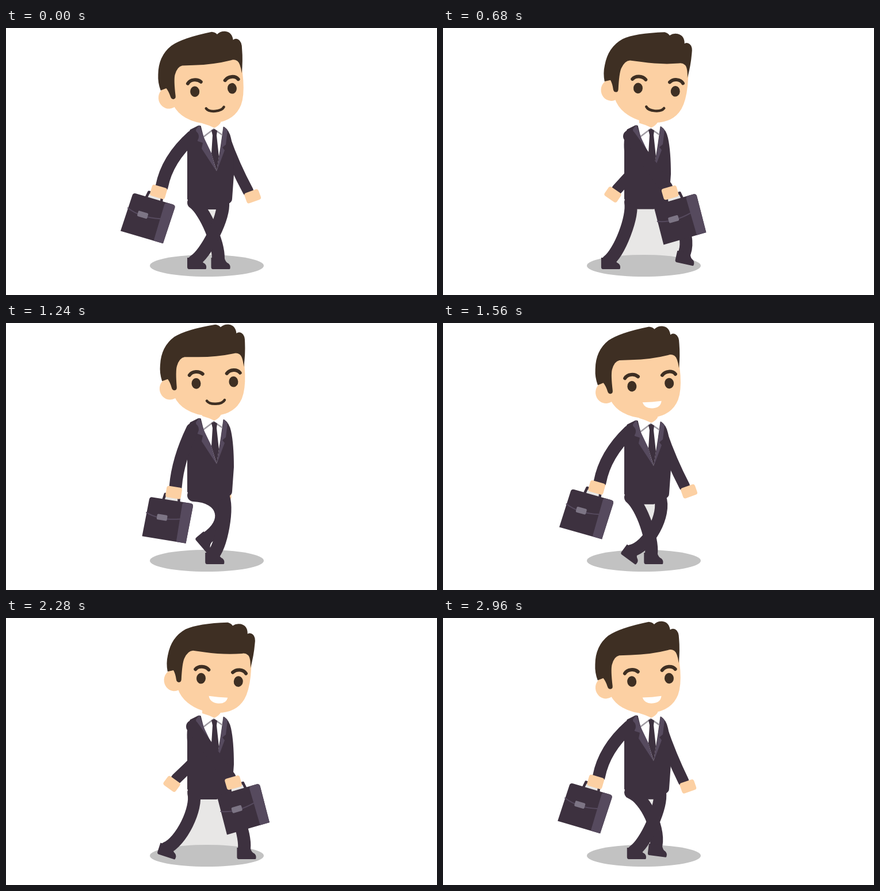
An HTML page with a canvas that plays this animation: 749 by 465 pixels, repeating every 3000 ms.

```html
<!DOCTYPE html>
<html lang="en">
<head>
<meta charset="utf-8">
<title>Walking businessman</title>
<style>
  html, body { margin: 0; width: 100%; height: 100%; overflow: hidden; background: #fff; }
  canvas { display: block; }
</style>
</head>
<body>
<canvas id="stage" width="749" height="465"></canvas>
<script>
const ctx = document.getElementById('stage').getContext('2d');
const SUIT = '#3d313f', LAPEL = '#564a5e', SKIN = '#fcd0a3', HAIR = '#3e2f23';
const GAP = '#e8e7e6', SHADOW = '#c2c2c2', CLASP = '#7d7585';
const LOOP = 3000, CYCLE = 1500, STEP = 750, TICK = 40;
const STRIDE = 90, GROUND = 420;

// Foot in the air: progress, x, lift, toe-down angle
const SWING = [
  [0, 0, 0, 0], [.08, -10, 9, 36], [.3, 12, 34, 62],
  [.63, 53, 34, 53], [.91, 88, 9, 12], [1, STRIDE, 0, 0]
];

const shape = {
  foot: 'M-16-20H7Q9-12 14-10Q18-7 17-1L16 0H-13Q-16 0-16-4Z',
  torso: 'M334 170L320 177Q313 190 315 215V298Q318 304 327 307L338 316H366L387 306Q393 303 393 297L396 255Q396 215 391 192Q388 178 379 172Z',
  shirt: 'M338 168L344 192L366 249L373 205L378 169Z',
  neck: 'M341 150H373V165Q369 171 362 174Q352 169 341 166Z',
  lapelL: 'M336 169L330 177L333 197L342 200L340 210L366 250L357 218L345 193Z',
  lapelR: 'M378 172L385 178L382 203L376 208L380 213L366 250L373 210Z',
  tie: 'M357 178L362 176L367 179L366 187L370 224L366 249L357 219L359 187Z',
  collar: 'M344 189L361 176L377 187',
  face: 'M284 50H418L418.5 95Q418 122 411 137Q398 163 364 164.500Q335 166 313 151Q300 142 294 128Z',
  hair: 'M274 100Q270 86 272 72Q275 40 299 24Q320 12 371 6Q377 7 380 11Q386 6 394 7Q406 9 407 23Q411 20 416 23Q422 27 421 40Q421 60 417 82Q416 64 411 60Q406 56 400 58Q370 63 335 61L315 60Q306 61 301 75Q298 84 299 112Q299 117 295 117Q291 117 290 112Q288 103 284 97Z',
  brows: 'M322 92C327 85 339 85 345 91M387 92C393 85 405 85 410 92',
  smile: 'M350 138C355 146 376 146 381 138',
  grin: 'M349 136.500Q366 137.500 382 136.500Q380 148 366 148Q352 148 349 136.500Z',
  handle: 'M-14 17L-12 5H12L14 17',
  caseBody: 'M-33 14H34Q39 14 39 19L37 84H-40L-38 19Q-38 14-33 14Z',
  caseSide: 'M20 19Q20 14 25 14H34Q39 14 39 19L37 84H20Z',
  flap: 'M-39 42Q-14 52 20 44'
};
for (const key in shape) shape[key] = new Path2D(shape[key]);

function fill(path, color) {
  ctx.fillStyle = color;
  ctx.fill(path);
}

function stroke(path, color, width) {
  ctx.strokeStyle = color;
  ctx.lineWidth = width;
  ctx.lineCap = ctx.lineJoin = 'round';
  ctx.stroke(path);
}

function oval(x, y, rx, ry, color) {
  const path = new Path2D();
  path.ellipse(x, y, rx, ry, 0, 0, Math.PI * 2);
  fill(path, color);
}

function block(x, y, w, h, r, color) {
  const path = new Path2D();
  path.roundRect(x - w / 2, y - h / 2, w, h, r);
  fill(path, color);
}

function at(x, y, degrees, draw) {
  ctx.save();
  ctx.translate(x, y);
  ctx.rotate(degrees * Math.PI / 180);
  draw();
  ctx.restore();
}

// Eased pendulum from -1 to 1 and back
function pendulum(t) {
  const s = -Math.cos(t / STEP * Math.PI);
  return 1.1 * s - .1 * s ** 3;
}

function footPose(t, baseX) {
  const p = (t % CYCLE) / STEP;
  if (p >= 1) return { x: baseX + STRIDE * (2 - p), y: GROUND, turn: 0, lift: 0, bend: 10 };
  const i = SWING.findIndex(row => row[0] > p);
  const a = SWING[i - 1], b = SWING[i];
  const f = (p - a[0]) / (b[0] - a[0]);
  const [, dx, lift, turn] = a.map((v, n) => v + (b[n] - v) * f);
  return { x: baseX + dx, y: GROUND - lift, turn, lift, bend: 10 + 32 * Math.sin(p * Math.PI) };
}

// Curve from hip to ankle, bent forward
function legCurve(hx, hy, foot) {
  const r = foot.turn * Math.PI / 180, c = Math.cos(r), s = Math.sin(r);
  const ax = foot.x - 4 * c + 14 * s, ay = foot.y - 4 * s - 14 * c;
  const dx = ax - hx, dy = ay - hy, d = Math.hypot(dx, dy);
  const nx = dy / d * foot.bend * 4 / 3, ny = -dx / d * foot.bend * 4 / 3;
  return [hx, hy, hx + nx + dx * .2, hy + ny + dy * .2, ax + nx - dx * .2, ay + ny - dy * .2, ax, ay];
}

function drawLeg(curve, foot) {
  const path = new Path2D();
  path.moveTo(curve[0], curve[1]);
  path.bezierCurveTo(...curve.slice(2));
  stroke(path, SUIT, 22);
  at(foot.x, foot.y, foot.turn, () => fill(shape.foot, SUIT));
}

function drawGap(a, b) {
  const path = new Path2D();
  path.moveTo(b[0], b[1]);
  path.bezierCurveTo(...b.slice(2));
  path.lineTo(a[6], a[7]);
  path.bezierCurveTo(a[4], a[5], a[2], a[3], a[0], a[1]);
  fill(path, GAP);
}

function drawFarArm(t, bob) {
  const m = -pendulum(t - 20);
  const x = 358.5 + 70.5 * m * (.6 + .4 * m * m);
  const y = 291 + 2 * m + 8 * (1 - m * m);
  const path = new Path2D();
  path.moveTo(380, 192 + bob);
  path.quadraticCurveTo(368 + 29 * m, 240, x - 8 * m, y - 9);
  stroke(path, SUIT, 19);
  at(x, y, 8 - 28 * m, () => block(0, 0, 26, 19, 4, SKIN));
}

function drawTorso() {
  fill(shape.torso, SUIT);
  fill(shape.shirt, '#fff');
  fill(shape.neck, SKIN);
  stroke(shape.collar, '#a09ca3', 2.5);
  fill(shape.tie, SUIT);
  fill(shape.lapelL, LAPEL);
  fill(shape.lapelR, LAPEL);
}

function drawHead(grin) {
  oval(287, 114, 18, 19, SKIN);
  fill(shape.face, SKIN);
  fill(shape.hair, HAIR);
  oval(333, 107, 8, 9.3, HAIR);
  oval(398, 107, 8, 9.3, HAIR);
  stroke(shape.brows, HAIR, 6);
  if (grin) fill(shape.grin, '#fff');
  else stroke(shape.smile, HAIR, 4.5);
}

function drawNearArm(k, bob) {
  const angle = 2.5 + 34 * k, length = 117 + 4 * k, r = angle * Math.PI / 180;
  const sx = 324, sy = 189 + bob;
  const handX = sx + length * Math.sin(r), handY = sy + length * Math.cos(r);
  at(sx, sy, -angle, () => {
    const path = new Path2D();
    path.moveTo(0, 0);
    path.quadraticCurveTo(Math.min(0, k) * 17, length / 2, 0, length - 11);
    stroke(path, SUIT, 22);
  });
  at(handX, handY, -16.5 * k, () => {
    ctx.save();
    ctx.translate(4 * k, 0);
    fill(shape.handle, GAP);
    stroke(shape.handle, SUIT, 4.5);
    fill(shape.caseBody, SUIT);
    fill(shape.caseSide, LAPEL);
    stroke(shape.flap, LAPEL, 2);
    block(-11, 46, 18, 10, 2, CLASP);
    ctx.restore();
    block(0, 0, 27, 20, 4, SKIN);
  });
}

function draw(t) {
  const k = pendulum(t + 15);
  const bob = -5 * Math.sin(t / STEP * Math.PI) ** 2;
  const footA = footPose(t, 331), footB = footPose(t + STEP, 282.5);
  const legA = legCurve(377, 304 + bob, footA), legB = legCurve(326, 304 + bob, footB);

  ctx.fillStyle = '#fff';
  ctx.fillRect(0, 0, 749, 465);
  if (footB.lift < 15) drawGap(legA, legB);
  oval(349, 414, 99, 19, SHADOW);
  drawFarArm(t, bob);
  drawLeg(legB, footB);
  drawLeg(legA, footA);
  at(0, bob, 0, drawTorso);
  at(366, 171.7 + bob, 4.9 * k, () => {
    ctx.translate(-365.5, -171);
    drawHead(t >= CYCLE);
  });
  drawNearArm(k, bob);
}

const start = performance.now();
function frame(now) {
  const t = Math.max(0, now - start) % LOOP;
  draw(Math.floor(t / TICK) * TICK);
  requestAnimationFrame(frame);
}
draw(0);
requestAnimationFrame(frame);
</script>
</body>
</html>
```
